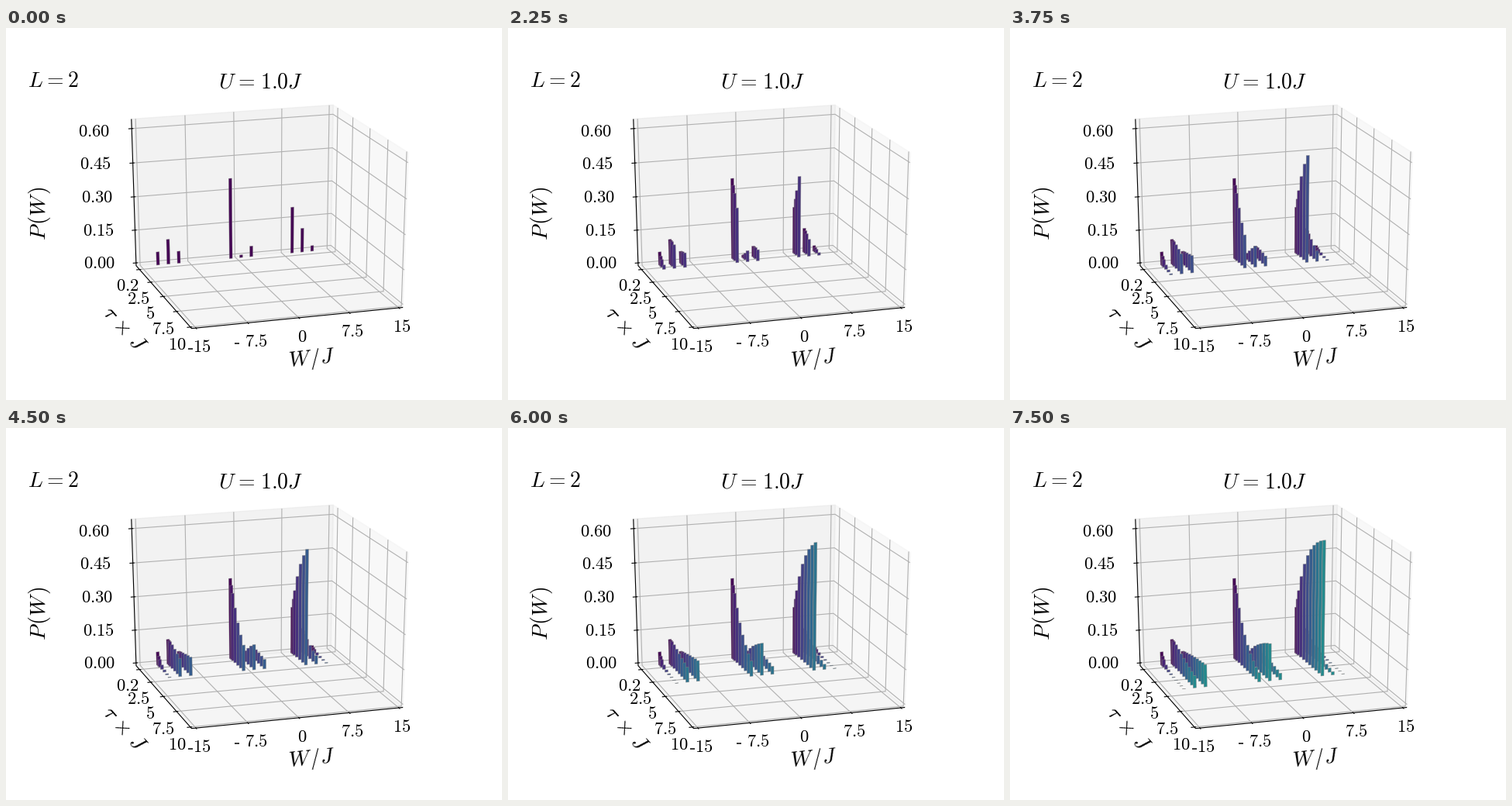
Animation, 640 px wide and 480 px high, one loop 8 s. Source, as a matplotlib script:

```python
import numpy as np
import matplotlib.pyplot as plt
from matplotlib.animation import FuncAnimation
from matplotlib.collections import LineCollection, PolyCollection

plt.rcParams["mathtext.fontset"] = "cm"

W, H, DPI = 640, 480, 100
ELEV, TURN = np.radians(21), np.radians(17.5)
LO, HI = -1 / 48, 1 + 1 / 48
TICK_OUT, TICK_IN = 0.2 / 12, 0.1 / 12

X_TICKS = ["-15", "- 7.5", "0", "7.5", "15"]
Y_TICKS = ["0.2", "2.5", "5", "7.5", "10"]
Z_TICKS = [f"{0.15 * i:.2f}" for i in range(5)]

# Short quench times first, then steps of a half
TAU = np.r_[0.2:0.7:0.2, 1:4.6:0.5]
FINAL = [-11.1, 0.38, 10.2]     # work of each final level
GAP = 1.63                      # spacing of the initial levels
START = [0.636, 0.235, 0.129]   # initial populations
BAR_W = 0.47


def unit_x(x):
    return (x + 15) / 30


def unit_y(y):
    return (y + 0.3) / 10.3


def unit_z(z):
    return z / 0.628


def project(u, v, w):
    """Unit-box coordinates (v grows towards the viewer) to pixels."""
    u, v, w = u - 0.5, v - 0.5, w - 0.5
    side = u * np.cos(TURN) + v * np.sin(TURN)
    near = v * np.cos(TURN) - u * np.sin(TURN)
    up = w * np.cos(ELEV) - near * np.sin(ELEV)
    depth = 10 - near * np.cos(ELEV) - w * np.sin(ELEV)
    px = 80 + 496 * (side / depth + 0.095) / 0.185
    py = 427.2 - 369.6 * (up / depth + 0.095) / 0.185
    return px, py


def path(*points):
    return [project(*p) for p in points]


def number(text):
    return float(text.replace(" ", ""))


def transitions(tau):
    """Chance of each final level (row) from each initial level (column)."""
    a = 1 - 0.71 * np.exp(-0.535 * tau * np.tanh(0.3 + 1.8 * tau))
    b = 1 - 0.6 * np.exp(-0.21 * tau)
    e = 0.125 * np.exp(-1.4 * tau)
    f = 0.24 * np.exp(-0.95 * tau)
    return np.array([[e, 1 - e - b, b],
                     [1 - a - e, a + b + e + f - 1, 1 - b - f],
                     [a, 1 - a - f, f]])


fig = plt.figure(figsize=(W / DPI, H / DPI), dpi=DPI, facecolor="white")
ax = fig.add_axes([0, 0, 1, 1])
ax.set_xlim(0, W)
ax.set_ylim(H, 0)
ax.axis("off")


def label(x, y, text, size=16.3, angle=0, ha="center", va="center"):
    ax.text(x, y, f"${text}$", fontsize=size, rotation=angle, ha=ha, va=va,
            rotation_mode="anchor", color="black", zorder=5)


def signed_label(x, y, text):
    """Centred number whose minus sign is a short hyphen."""
    digits = text.lstrip("- ")
    lead = 6.5 * (len(text) - len(digits))
    label(x + lead / 2, y, digits)
    if lead:
        left = x - lead / 2 - (5.5 + 7.5 * len(digits)) / 2 - 1
        ax.plot([left, left + 6], [y + 2, y + 2], color="black", lw=1.1,
                solid_capstyle="butt", zorder=5)


def draw_box():
    panes = [
        (0.95, path((HI, LO, LO), (HI, HI, LO), (HI, HI, HI), (HI, LO, HI))),
        (0.90, path((LO, LO, LO), (HI, LO, LO), (HI, LO, HI), (LO, LO, HI))),
        (0.925, path((LO, LO, LO), (HI, LO, LO), (HI, HI, LO), (LO, HI, LO))),
    ]
    for grey, pts in panes:
        ax.add_patch(plt.Polygon(pts, color=(grey,) * 3, alpha=0.5, lw=1))

    grid, black = [], []
    for text in X_TICKS:
        u = unit_x(number(text))
        grid.append(path((u, LO, HI), (u, LO, LO), (u, HI, LO)))
        black.append(path((u, HI + TICK_OUT, LO), (u, HI - TICK_IN, LO)))
        signed_label(*project(u, HI + 0.05, LO - 0.108), text)
    for text in Y_TICKS:
        v = unit_y(number(text))
        grid.append(path((LO, v, LO), (HI, v, LO), (HI, v, HI)))
        black.append(path((LO - TICK_OUT, v, LO), (LO + TICK_IN, v, LO)))
        label(*project(LO - 0.066, v, LO - 0.112), text)
    for i, text in enumerate(Z_TICKS):
        w = unit_z(number(text))
        grid.append(path((LO, LO, w), (HI, LO, w), (HI, HI, w)))
        black.append(path((LO - TICK_OUT, LO, w), (LO + TICK_IN, LO, w)))
        label(121 - 1.75 * i, 303.7 - 42.6 * i, text)
    black.append(path((LO, LO, HI), (LO, LO, LO), (LO, HI, LO), (HI, HI, LO)))
    ax.add_collection(LineCollection(grid, colors="#b0b0b0", linewidths=0.8))
    ax.add_collection(LineCollection(black, colors="black", linewidths=0.8))


def draw_titles():
    label(28, 76, r"L\hspace{0.02}=\hspace{0.02}2", 20,
          ha="left", va="baseline")
    label(273.5, 78, r"U\hspace{0.08}=\hspace{0.08}1.0J", 20,
          ha="left", va="baseline")
    label(43, 239, r"P\hspace{0.1}(W\hspace{0.1})", 20, 90)
    label(394.5, 428, r"W\hspace{0.05}/J", 20, 5.7)
    label(153, 388, r"\tau\hspace{0.15}\times\hspace{0.15}J", 20, -48)


def bar_set(k):
    """All bars for one quench time."""
    probs = transitions(TAU[k]) * START
    v = unit_y(TAU[k])
    faces = []
    for centre, row in zip(FINAL, probs):
        for j, prob in enumerate(row):
            x = centre + (j - 1) * GAP
            a, b = unit_x(x - BAR_W / 2), unit_x(x + BAR_W / 2)
            w = unit_z(prob)
            faces.append(path((a, v, 0), (b, v, 0), (b, v, w), (a, v, w)))
    bars = PolyCollection(faces, facecolors=[plt.cm.viridis(k / 21)],
                          edgecolors=[(0.5, 0.5, 0.5, 0.7)], linewidths=0.45,
                          zorder=3 + k / 100)
    return ax.add_collection(bars)


draw_box()
draw_titles()
bar_sets = [bar_set(k) for k in range(len(TAU))]


def update(i):
    shown = min(i // 3, len(TAU) - 1)
    for k, bars in enumerate(bar_sets):
        bars.set_visible(k <= shown)
    return bar_sets


anim = FuncAnimation(fig, update, frames=32, interval=250, repeat=True,
                     repeat_delay=0, blit=False)
plt.show()
```
